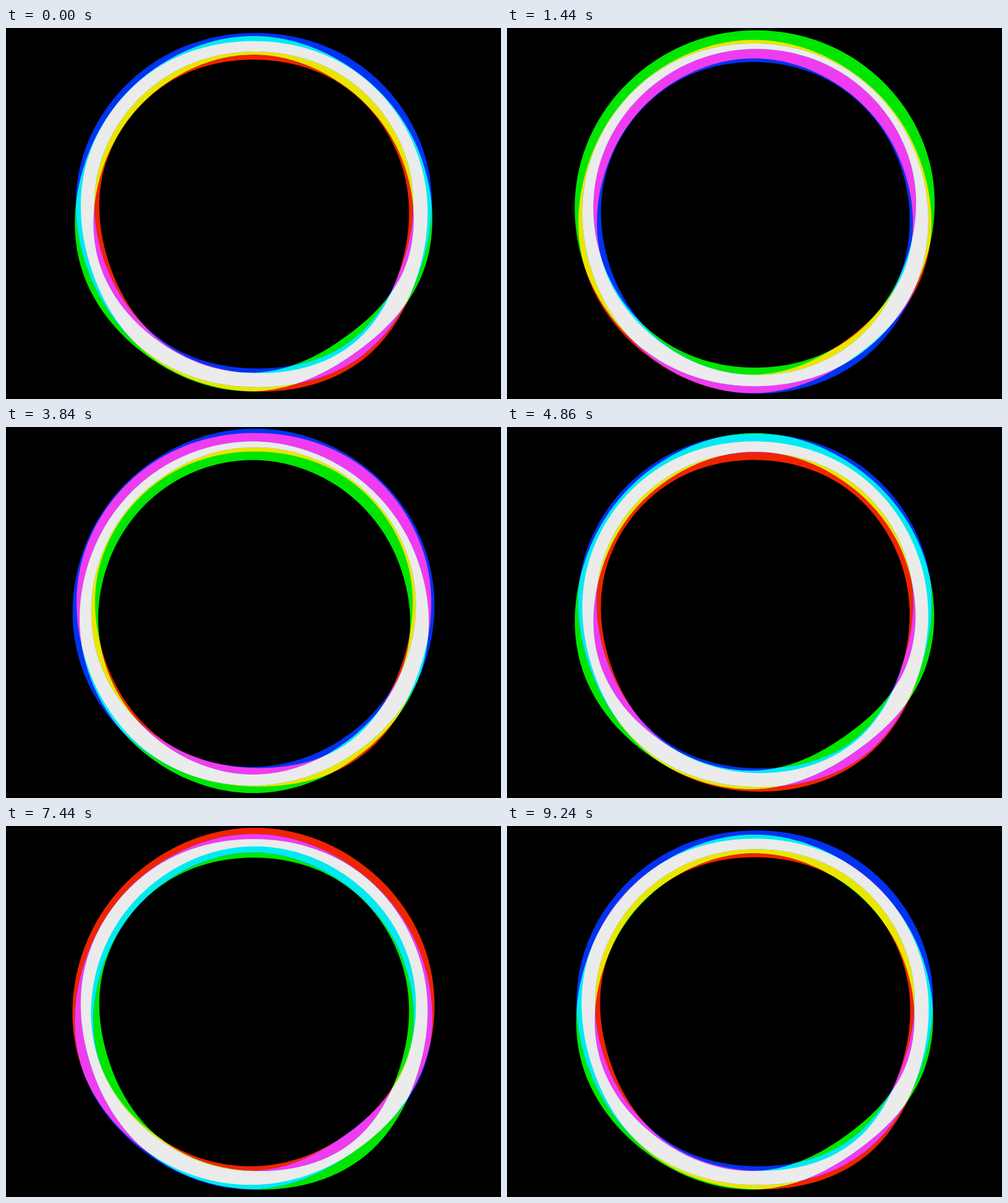
These frames come from a looping animation (800 px wide and 600 px high, 9.3 s). An HTML page with a canvas:

```html
<!DOCTYPE html>
<html lang="en">
<head>
<meta charset="utf-8">
<title>Three wobbling rings</title>
<style>
  html, body { margin: 0; width: 100%; height: 100%; overflow: hidden; background: #000; }
  canvas { display: block; width: 800px; height: 600px; }
</style>
</head>
<body>
<canvas id="stage" width="800" height="600"></canvas>
<script>
const ctx = document.getElementById('stage').getContext('2d');
const TAU = Math.PI * 2;
const STEP = 60, LOOP = 9300, PERIOD = LOOP / 2;
const CX = 400.6, CY = 299.8, RADIUS = 270.9, HALF_WIDTH = 15;
const SIDES = 360;

// Ten anchors, clockwise from the top; each swings in and out as a sine
const anchors = [
  { swing: 11.3, lag: 0 },
  { swing: 11.3, lag: 20 },
  { swing: 9, lag: 9 },
  { swing: 4, lag: -65 },
  { swing: 9, lag: 129 },
  { swing: 6.5, lag: 200 },
  { swing: 2.5, lag: 235 },
  { swing: 8.4, lag: -47 },
  { swing: 7.6, lag: 14 },
  { swing: 8.9, lag: 19 }
];

// All rings share the same wobble, a few fifths of a turn apart
const FIRST_PHASE = 85.5, FIFTH = 72;
const rings = [
  { color: '#f02300', fifths: 2 },
  { color: '#00e600', fifths: 0 },
  { color: '#0032f0', fifths: 3 }
];
const overlaps = [
  [0, 1, '#ebe600'],
  [0, 2, '#f03cf0'],
  [1, 2, '#00ebf0']
];
const WHITE = '#ebebeb';

// Closed Catmull-Rom curve through evenly spaced values
function sample(values, turn) {
  const n = values.length;
  const pos = turn * n, i = Math.floor(pos), u = pos - i;
  const [a, b, c, d] = [-1, 0, 1, 2].map(k => values[(i + k + n) % n]);
  return b + 0.5 * u * (c - a + u * (2 * a - 5 * b + 4 * c - d + u * (3 * (b - c) + d - a)));
}

function ringPath(time, fifths) {
  const angle = time / PERIOD * 360 - FIRST_PHASE - fifths * FIFTH;
  const offsets = anchors.map(({ swing, lag }) => swing * Math.cos((angle - lag) / 360 * TAU));
  const path = new Path2D();
  for (const side of [HALF_WIDTH, -HALF_WIDTH]) {
    for (let i = 0; i < SIDES; i++) {
      const turn = i / SIDES;
      const r = RADIUS + side + sample(offsets, turn);
      const x = CX + r * Math.sin(turn * TAU);
      const y = CY - r * Math.cos(turn * TAU);
      if (i === 0) path.moveTo(x, y);
      else path.lineTo(x, y);
    }
    path.closePath();
  }
  return path;
}

// Fills the area shared by all given paths
function fillShared(paths, color) {
  const [shape, ...masks] = paths;
  ctx.save();
  masks.forEach(mask => ctx.clip(mask, 'evenodd'));
  ctx.fillStyle = color;
  ctx.fill(shape, 'evenodd');
  ctx.restore();
}

function draw(time) {
  ctx.fillStyle = '#000';
  ctx.fillRect(0, 0, 800, 600);
  const paths = rings.map(ring => ringPath(time, ring.fifths));
  rings.forEach((ring, i) => fillShared([paths[i]], ring.color));
  overlaps.forEach(([a, b, color]) => fillShared([paths[a], paths[b]], color));
  fillShared(paths, WHITE);
}

const start = performance.now();
function tick() {
  const elapsed = (performance.now() - start) % LOOP;
  draw(Math.floor(elapsed / STEP) * STEP);
  requestAnimationFrame(tick);
}
tick();
</script>
</body>
</html>
```
